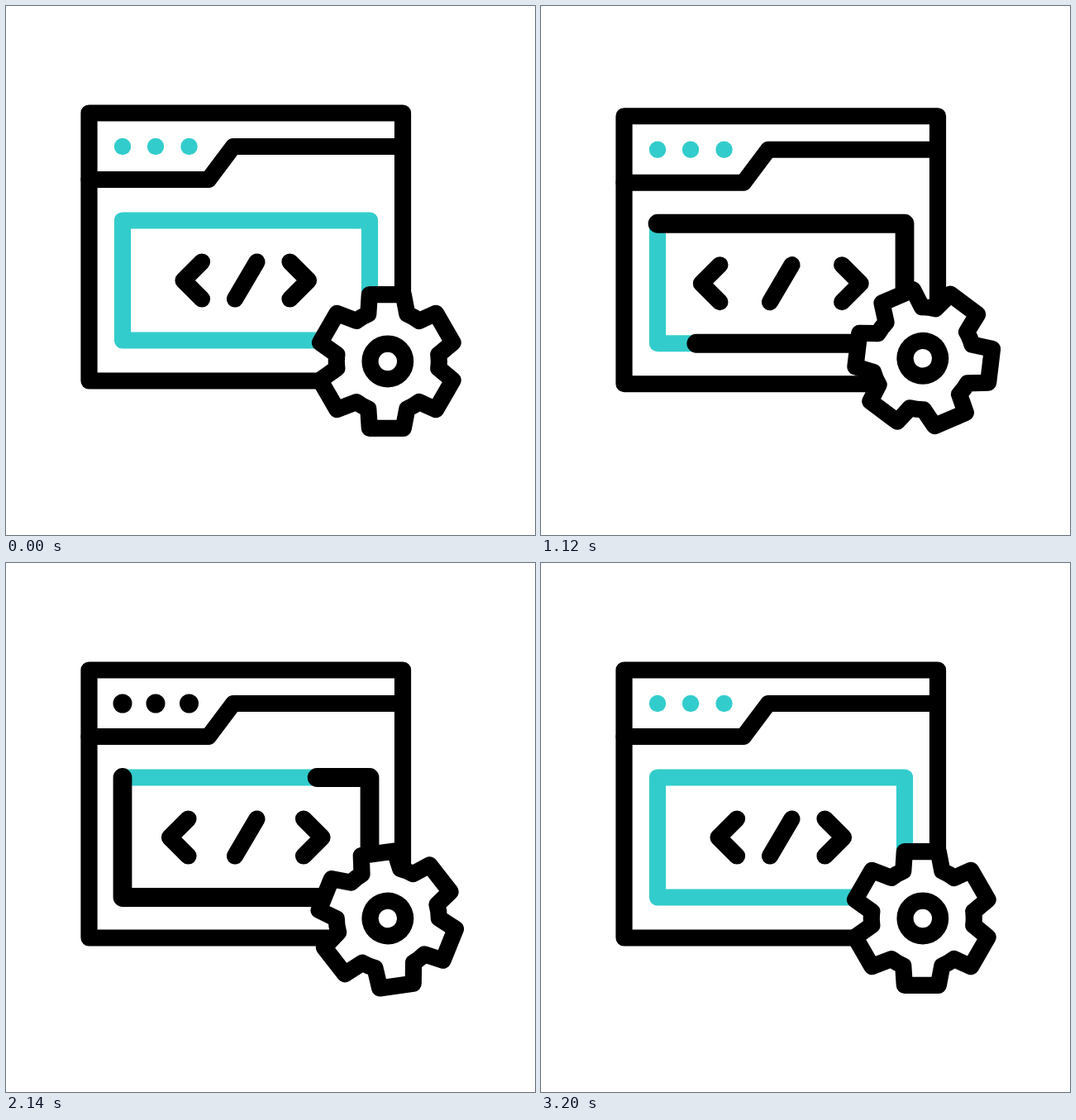
An HTML page that plays this animation: 640 by 640 pixels, repeating every 3400 ms.

```html
<!DOCTYPE html>
<html lang="en">
<head>
<meta charset="utf-8">
<title>Code window with gear</title>
<style>
  html, body { margin: 0; width: 100%; height: 100%; overflow: hidden; background: #fff; }
  svg { display: block; width: 100vw; height: 100vh; }
  .line { fill: none; stroke: #000; stroke-width: 20.2; stroke-linecap: round; stroke-linejoin: round; }
  .teal { stroke: #33cccc; }
  .trail { stroke-width: 22.8; }
  .solid { fill: #fff; }
</style>
</head>
<body>
<svg viewBox="0 0 640 640">
  <g id="win">
    <path class="line solid" d="M100.5 129.5H480V453.5H100.5Z"/>
    <path class="line" d="M100.5 210H245L275 170H480"/>
    <g id="dots">
      <circle cx="141" cy="170"/>
      <circle cx="181" cy="170"/>
      <circle cx="221.5" cy="170"/>
    </g>
    <path class="line teal" d="M141 259.5H440V404.5H141Z"/>
    <path class="line trail" id="trail" d="M141 259.5H440V404.5H141V259.5"/>
    <path class="line" id="left" d="M237 309.5L214.5 332L237 354.5"/>
    <path class="line" d="M303.5 309.5L277 354.5"/>
    <path class="line" id="right" d="M343.5 309.5L366 332L343.5 354.5"/>
  </g>
  <g id="gear">
    <path class="line solid" id="teeth"/>
    <circle class="line" r="21.3"/>
  </g>
</svg>
<script>
  const LOOP = 3400, END = 3200, STEP = 20, BEAT = 400;
  const PERIMETER = 888, SPREAD = 23;
  const PIVOT = [461.8, 430];

  // Vertical offsets as [time, value], eased between keys
  const WIN_Y = [[0, 0], [400, -38.8], [800, 41], [1200, -0.6], [1280, 0]];
  const GEAR_Y = [[0, 0], [400, 58.8], [800, -41], [1200, 0.6], [1280, 0]];
  // Gear angle as [time, degrees], joined by a smooth curve
  const TURN = [[0, 0], [420, 34.5], [780, 96.5], [1120, 156.8], [1800, 251.5], [2480, 325], [3200, 360]];

  const el = id => document.getElementById(id);
  const ease = p => {
    p = Math.min(1, Math.max(0, p));
    return p * p * (3 - 2 * p);
  };

  function segment(keys, t) {
    let i = 0;
    while (i < keys.length - 2 && t >= keys[i + 1][0]) i++;
    return i;
  }

  function eased(keys, t) {
    const i = segment(keys, t);
    const [t0, a] = keys[i], [t1, b] = keys[i + 1];
    return a + (b - a) * ease((t - t0) / (t1 - t0));
  }

  function slope(keys, i) {
    if (i === 0 || i === keys.length - 1) return 0;
    const [[ta, a], [tb, b], [tc, c]] = keys.slice(i - 1, i + 2);
    const h = tb - ta, k = tc - tb;
    return ((b - a) / h * k + (c - b) / k * h) / (h + k);
  }

  function smooth(keys, t) {
    const i = segment(keys, t);
    const [t0, a] = keys[i], [t1, b] = keys[i + 1];
    const h = t1 - t0, p = (t - t0) / h, q = 1 - p;
    return a + (b - a) * ease(p)
      + h * p * q * (slope(keys, i) * q - slope(keys, i + 1) * p);
  }

  function gearPath() {
    const point = (r, deg, dx = 0) => {
      const a = deg * Math.PI / 180;
      return (r * Math.cos(a) + dx).toFixed(2) + ' ' + (r * Math.sin(a)).toFixed(2);
    };
    const base = 62, tip = 83.5, shift = -1.5;
    let d = '';
    for (let a = 30; a < 390; a += 60) {
      d += (d ? `A${base} ${base} 0 0 1 ` : 'M') + point(base, a - 22.3)
        + 'L' + point(tip, a - 14.2, shift)
        + 'L' + point(tip, a + 14.2, shift)
        + 'L' + point(base, a + 22.3);
    }
    return d + `A${base} ${base} 0 0 1 ${point(base, 7.7)}Z`;
  }

  const win = el('win'), gear = el('gear'), trail = el('trail');
  const left = el('left'), right = el('right'), dots = [...el('dots').children];
  el('teeth').setAttribute('d', gearPath());

  function draw(t) {
    win.setAttribute('transform', `translate(0 ${eased(WIN_Y, t)})`);
    gear.setAttribute('transform',
      `translate(${PIVOT[0]} ${PIVOT[1] + eased(GEAR_Y, t)}) rotate(${smooth(TURN, t)})`);

    // Brackets open and close every two beats
    const phase = t % (2 * BEAT) / BEAT;
    const gap = SPREAD * ease(phase < 1 ? phase : 2 - phase);
    left.setAttribute('transform', `translate(${-gap} 0)`);
    right.setAttribute('transform', `translate(${gap} 0)`);

    const lit = phase >= 1;
    for (const dot of dots) {
      dot.setAttribute('fill', lit ? '#000' : '#33cccc');
      dot.setAttribute('r', lit ? 11.5 : 10.2);
    }

    // The trail grows in the first half and is eaten up in the second
    const from = PERIMETER * ease((t - END / 2) / (END / 2));
    const to = PERIMETER * ease(t / (END / 2));
    trail.style.display = to - from > 0.01 ? '' : 'none';
    trail.setAttribute('stroke-dasharray', `${to - from} 2000`);
    trail.setAttribute('stroke-dashoffset', -from);
  }

  const start = performance.now();
  function tick() {
    const t = (performance.now() - start) % LOOP;
    draw(Math.min(END, Math.floor(t / STEP) * STEP));
    requestAnimationFrame(tick);
  }
  tick();
</script>
</body>
</html>
```
